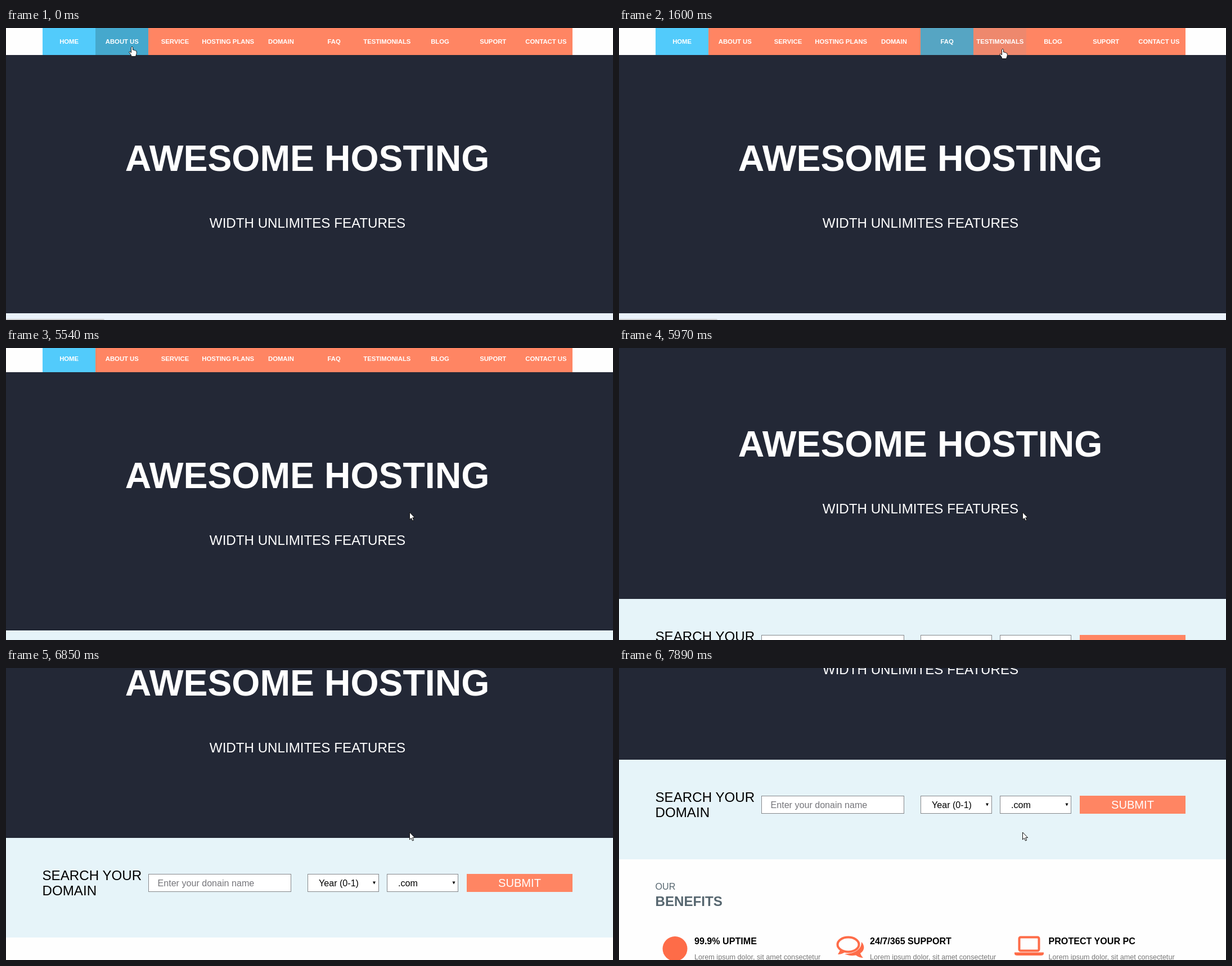
Animation of 1079 by 519 pixels, one loop 8000 ms. Source, as an HTML page:

```html
<!DOCTYPE html>
<html lang="en">
<head>
<meta charset="utf-8">
<title>Awesome Hosting</title>
<style>
  html, body { margin: 0; width: 100%; height: 100%; overflow: hidden; background: #fefefe; }
  svg { display: block; font-family: "Liberation Sans", Arial, sans-serif; }
  .mid { text-anchor: middle; }
  .bold, #nav { font-weight: bold; }
  #nav { font-size: 11.3px; fill: #fff; }
  .title { font-size: 64.4px; }
  .large { font-size: 24.15px; }
  .medium { font-size: 16.1px; }
  .small { font-size: 12.65px; fill: #777; }
  .field { fill: #fff; stroke: #85878b; }
</style>
</head>
<body>
<svg width="1079" height="519" viewBox="0 0 1079 519">
  <rect width="1079" height="519" fill="#fefefe"/>
  <g id="page">
    <g id="nav"></g>
    <rect y="48" width="1079" height="459" fill="#232836"/>
    <g class="mid" fill="#fff">
      <text class="title bold" x="535.5" y="254">AWESOME HOSTING</text>
      <text class="large" x="536" y="355">WIDTH UNLIMITES FEATURES</text>
    </g>

    <rect id="band" y="507" width="1079" height="177"/>
    <text class="large" x="64.5" y="582">SEARCH YOUR</text>
    <text class="large" x="64.5" y="609">DOMAIN</text>
    <g class="field">
      <rect x="253.5" y="571.5" width="253" height="31"/>
      <rect x="536.5" y="571.5" width="126" height="31"/>
      <rect x="677.5" y="571.5" width="126" height="31"/>
    </g>
    <g class="medium">
      <text x="269.5" y="593" fill="#75757a">Enter your donain name</text>
      <text x="556" y="593">Year (0-1)</text>
      <text x="697" y="593">.com</text>
    </g>
    <path d="M652 584.5h5l-2.5 5zM793.500 584.5h5l-2.500 5z"/>
    <rect x="819" y="571" width="188" height="32" fill="#ff8563"/>
    <text class="mid" x="913" y="594" fill="#fff" font-size="20.13">SUBMIT</text>

    <g fill="#56666f">
      <text class="medium" x="64.5" y="738">OUR</text>
      <text class="large bold" x="64.5" y="767">BENEFITS</text>
    </g>
    <g id="benefits"></g>
    <g fill="#fe6c48">
      <circle cx="99.5" cy="843" r="22"/>
      <path d="M394 844l-5 9q8 0 14-5zM431 831C438 838 436 847 429 851Q430 855 434 859Q427 859 421 854.500C414 856 406 855 401 852C418 852 431 845 431 831Z"/>
      <ellipse cx="407.500" cy="835.500" rx="19" ry="13" fill="#fefefe" stroke="#fe6c48" stroke-width="4"/>
      <rect x="711.500" y="822.500" width="35" height="24" rx="2.500" fill="none" stroke="#fe6c48" stroke-width="4"/>
      <path d="M703 849.500h52v2q0 3.500-5 3.500h-42q-5 0-5-3.500z"/>
    </g>
  </g>
  <path id="status" d="M0 517h173q2 0 2 2H0z" fill="#cfd1d4"/>
  <path id="cursor" fill="#fff" stroke="#111" stroke-linejoin="round"/>
</svg>
<script>
const $ = id => document.getElementById(id);
const NS = "http://www.w3.org/2000/svg";
const LOOP = 8000, FADE = 300;
const ORANGE = [255, 133, 99], HOVER = [69, 168, 205];

const HAND = "M-1.5 1.500q1.500-3 3 0V6q1.800-.8 2.500.7q1.600-.6 2.300.8q1.800-.2 1.900 1.700V12.500L6.500 17.500H-1L-2 14.500L-5 10.500q-.2-2 1.500-1.700L-1.500 11Z";
const ARROW = "M.5 0V13L3.500 10.300L5.500 15L7.700 14.100L5.700 9.600H9.700Z";

const TICKS = [0, 130, 280, 430, 570, 720, 870, 1020, 1170, 1320, 1470, 1600,
  1750, 1900, 2050, 2210, 2360, 2510, 2660, 2790, 5540, 5690, 5840, 5980, 6130,
  6270, 6410, 6550, 6850, 7000, 7160, 7310, 7450, 7600, 7740, 7890];

// Keys: time, then values
const POINTER = [[0, 224, 33], [1170, 580, 40], [1550, 628, 38], [1600, 682, 37],
  [2210, 985, 42], [2360, 1003, 59], [2790, 717, 292]];
const SCROLL = [[5400, 0], [5540, 5], [6270, 142], [6550, 198], [6700, 198],
  [6850, 205], [7160, 252], [7890, 344]];

// Times the pointer enters each tab after Home, and finally leaves the bar
const ENTER = [-FADE, 95, 408, 716, 1025, 1573, 1684, 1874, 2063, 2263];
const LEAVE = ENTER[ENTER.length - 1];

const clamp = v => Math.max(0, Math.min(1, v));

function add(parent, tag, attrs, text = "") {
  const el = document.createElementNS(NS, tag);
  for (const key in attrs) el.setAttribute(key, attrs[key]);
  el.textContent = text;
  return parent.appendChild(el);
}

function along(keys, t) {
  let i = 1;
  while (i < keys.length - 1 && t > keys[i][0]) i++;
  const a = keys[i - 1], b = keys[i];
  const k = clamp((t - a[0]) / (b[0] - a[0]));
  return a.slice(1).map((v, n) => Math.round(v + (b[n + 1] - v) * k));
}

const edge = i => Math.round(65 + 94.2 * i);
const tabs = ["HOME", "ABOUT US", "SERVICE", "HOSTING PLANS", "DOMAIN", "FAQ",
  "TESTIMONIALS", "BLOG", "SUPORT", "CONTACT US"].map((label, i) => {
  const box = add($("nav"), "rect", {
    x: edge(i), width: edge(i + 1) - edge(i), height: 48, fill: "#52cbfb"
  });
  add($("nav"), "text", { class: "mid", x: 65 + 94.2 * (i + 0.5), y: 28 }, label);
  return box;
});

[[134, "99.9% UPTIME"], [446, "24/7/365 SUPPORT"], [763.5, "PROTECT YOUR PC"]].forEach(([x, head]) => {
  add($("benefits"), "text", { class: "medium bold", x, y: 835 }, head);
  add($("benefits"), "text", { class: "small", x, y: 862 }, "Lorem ipsum dolor, sit amet consectetur");
});

function draw(now) {
  const time = now % LOOP;
  const t = TICKS.filter(tick => tick <= time).pop();
  const [scroll] = along(SCROLL, t);
  const [x, y] = along(POINTER, t);

  $("page").setAttribute("transform", `translate(0 ${-scroll})`);
  $("band").setAttribute("fill", scroll ? "#e6f4f9" : "#eaf2fb");
  $("status").setAttribute("visibility", t < 2660 ? "visible" : "hidden");
  $("cursor").setAttribute("d", t < LEAVE ? HAND : ARROW);
  $("cursor").setAttribute("transform", `translate(${x} ${y})`);

  tabs.slice(1).forEach((tab, i) => {
    const k = clamp((t - ENTER[i]) / FADE) - clamp((t - ENTER[i + 1]) / FADE);
    const rgb = ORANGE.map((c, n) => Math.round(c + (HOVER[n] - c) * k));
    tab.setAttribute("fill", `rgb(${rgb})`);
  });
}

function loop() {
  draw(performance.now());
  requestAnimationFrame(loop);
}
loop();
</script>
</body>
</html>
```
